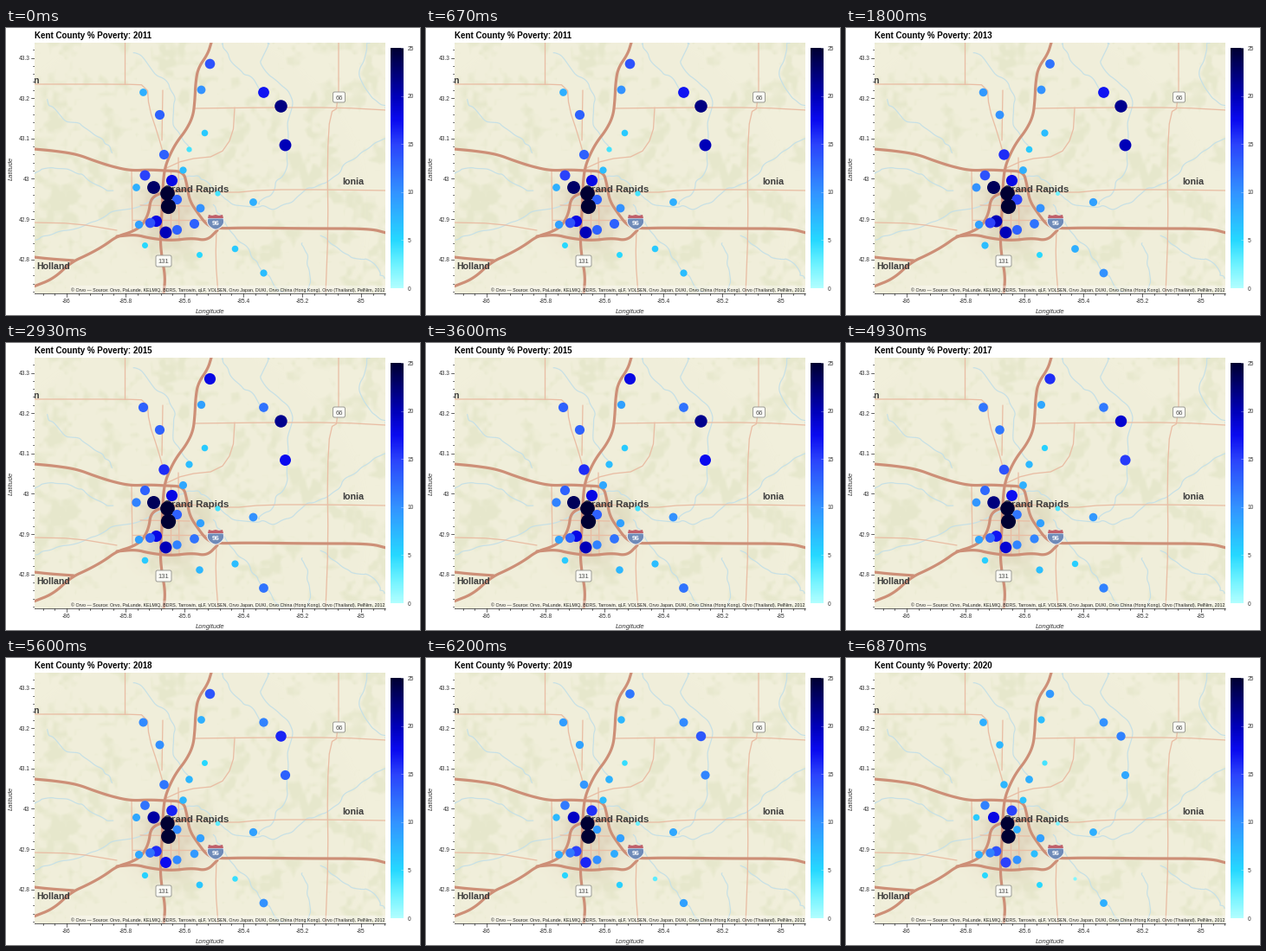
These frames come from a looping animation (478 px wide and 332 px high, 7.34 s). A matplotlib script:

```python
import matplotlib.pyplot as plt
import numpy as np
from matplotlib.animation import FuncAnimation
from matplotlib.collections import LineCollection
from matplotlib.colors import LinearSegmentedColormap
from matplotlib.patches import FancyBboxPatch, Polygon, Rectangle

W, H, DPI = 478, 332, 100
LEFT, RIGHT, TOP, BOTTOM = 33, 438, 17, 307
PT = 72 / DPI
STEP, LOOP = 20, 7340
YEAR_MS = 2200 / 3
MAX_VALUE = 25

plt.rcParams["font.family"] = "Liberation Sans"
rng = np.random.default_rng(7)

SCALE = LinearSegmentedColormap.from_list("poverty", [
    (0.0, "#b2ffff"), (0.1, "#6cf2ff"), (0.2, "#26d8ff"), (0.4, "#3392ff"),
    (0.6, "#2b42fb"), (0.7, "#0a0af0"), (0.8, "#0000b8"), (1.0, "#000032")])

SITES = np.array([
    (235, 41), (225, 71), (158, 74), (177, 100), (297, 74), (317, 90),
    (322, 135), (229, 121), (211, 140), (182, 146), (204, 164), (160, 170),
    (191, 176), (150, 184), (170, 184), (186, 191), (197, 198), (187, 206),
    (244, 191), (285, 201), (224, 208), (217, 226), (173, 223), (166, 225),
    (153, 227), (184, 236), (197, 233), (160, 251), (223, 262), (264, 255),
    (297, 283)])

# Poverty rate of each site in the key years
KEY_YEARS = (2011, 2013, 2015, 2020)
RATES = np.array([
    (14, 12, 18, 9.5), (10, 10, 9, 7), (8, 9.5, 13, 8), (13, 10, 13, 7.5),
    (17, 17, 12, 10), (22, 21.5, 21.5, 11), (20, 20, 17.5, 8.5),
    (6, 7, 6, 4), (4, 6, 7, 8), (13, 16, 16, 7.5), (7, 8, 8.5, 6.5),
    (15, 14, 13, 11), (18, 18, 18, 15), (8, 10, 11, 6), (23, 23.5, 23.5, 18),
    (29, 29, 29, 26), (13, 15, 13, 8), (31, 31, 31, 28), (4, 2.5, 4, 2.2),
    (8, 9, 10, 8), (10, 10, 9, 9), (13, 12, 12, 7), (18, 20, 18, 14),
    (14, 15, 13, 11), (9, 9, 9, 8), (20, 20, 20, 15), (13, 13, 11, 10),
    (5, 7, 6, 5), (5, 5, 7.5, 5), (6, 8, 7, 1.8), (7, 10, 12, 8)])

HIGHWAYS = [
    [(237, 17), (233, 30), (222, 46), (219, 62), (218, 84), (216, 102),
     (208, 118), (197, 132), (189, 147), (183, 163), (181, 185), (180, 215),
     (178, 245), (180, 266), (184, 288), (182, 308)],
    [(32, 140), (55, 142), (82, 146), (103, 154), (125, 161), (145, 165),
     (165, 164), (185, 165), (205, 166), (209, 182), (212, 200), (222, 215),
     (232, 228), (244, 232), (275, 231), (350, 232), (420, 232), (439, 237)],
    [(32, 299), (55, 290), (75, 271), (95, 262), (113, 252), (128, 241),
     (145, 236), (157, 229), (165, 214), (167, 197), (180, 190), (212, 187)],
    [(128, 241), (150, 239), (165, 243), (190, 246), (215, 243), (232, 246),
     (244, 234)],
    [(32, 265), (50, 267), (78, 269)],
]
MINOR_ROADS = [
    [(32, 65), (137, 65), (163, 66), (165, 92), (175, 122), (183, 150)],
    [(137, 16), (137, 65)],
    [(218, 93), (300, 92), (385, 92), (439, 95)],
    [(384, 16), (384, 92), (374, 98), (371, 150), (372, 232), (369, 308)],
    [(264, 92), (262, 125), (246, 148), (207, 152), (183, 163)],
    [(212, 187), (258, 191), (300, 187), (372, 187), (439, 188)],
    [(243, 232), (242, 268), (245, 308)],
    [(181, 72), (180, 130)],
    [(145, 165), (146, 236)],
    [(155, 205), (212, 206)],
    [(146, 222), (232, 222)],
    [(190, 165), (190, 246)],
    [(199, 150), (200, 246)],
    [(32, 225), (80, 226), (128, 234)],
]
RIVERS = [
    [(304, 17), (290, 38), (310, 60), (332, 82), (325, 112), (327, 148),
     (313, 185), (292, 205)],
    [(439, 128), (405, 146), (375, 178), (345, 188), (318, 208), (285, 208),
     (252, 200), (232, 178), (214, 168), (186, 182), (160, 208), (118, 215),
     (82, 232), (33, 243)],
    [(240, 205), (262, 238), (281, 262), (302, 282), (318, 307)],
    [(150, 28), (172, 52), (195, 75), (190, 112), (214, 140)],
    [(33, 168), (62, 160), (92, 172), (120, 190)],
    [(250, 17), (262, 42), (285, 58), (300, 82)],
    [(420, 17), (405, 52), (420, 80), (438, 92)],
    [(365, 240), (392, 262), (420, 268), (438, 290)],
    [(46, 85), (70, 108), (102, 118), (122, 142)],
    [(340, 250), (352, 272), (347, 306)],
]


def smooth(points, rounds=3):
    """Round a polyline by cutting its corners."""
    p = np.asarray(points, float)
    for _ in range(rounds):
        a, b = p[:-1], p[1:]
        cut = np.stack([0.75 * a + 0.25 * b, 0.25 * a + 0.75 * b], 1)
        p = np.vstack([p[:1], cut.reshape(-1, 2), p[-1:]])
    return p


def meander(points):
    p = smooth(points, 2)
    return smooth(p + rng.normal(0, 1.6, p.shape), 2)


def upsample(grid, rows, cols):
    """Stretch a coarse grid by linear interpolation on both axes."""
    h, w = grid.shape
    x, y = np.linspace(0, w - 1, cols), np.linspace(0, h - 1, rows)
    wide = np.array([np.interp(x, np.arange(w), row) for row in grid])
    return np.array([np.interp(y, np.arange(h), col) for col in wide.T]).T


def terrain():
    rows, cols = BOTTOM - TOP, RIGHT - LEFT
    noise = (0.6 * upsample(rng.random((14, 20)), rows, cols)
             + 0.4 * upsample(rng.random((50, 70)), rows, cols))
    y, x = np.mgrid[TOP:BOTTOM, LEFT:RIGHT]
    green = np.clip((noise - 0.52) * 5, 0, 1)[..., None]
    town = np.exp(-((x - 190) / 38) ** 2 - ((y - 212) / 36) ** 2)
    town = (town * np.clip(0.4 + noise, 0, 1))[..., None]
    land = np.array([241, 239, 219]) * (1 - green) + np.array([231, 232, 205]) * green
    return (land * (1 - town) + np.array([217, 203, 178]) * town) / 255


def full_axes(rect, x0, x1, y0, y1):
    ax = fig.add_axes(rect)
    ax.set(xlim=(x0, x1), ylim=(y1, y0))
    ax.axis("off")
    return ax


def label(ax, x, y, text, px, **kw):
    kw.setdefault("va", "center_baseline")
    return ax.text(x, y, text, fontsize=px * PT, clip_on=True, **kw)


def lines(ax, paths, color, px, z):
    ax.add_collection(LineCollection(
        paths, colors=color, linewidths=px * PT, zorder=z, capstyle="round"),
        autolim=False)


def shield(x, y, w, h, text):
    world.add_patch(FancyBboxPatch(
        (x - w / 2 + 2, y - h / 2 + 2), w - 4, h - 4, zorder=5,
        boxstyle="round,pad=2", fc="#fbfbf6", ec="#9a9a94", lw=0.7))
    label(world, x, y + 0.3, text, 7.6, ha="center", color="#555555", zorder=6)


def interstate(x, y):
    body = smooth([(-9, -4), (-10, 1), (-7, 6), (0, 10), (7, 6), (10, 1), (9, -4)], 2)
    world.add_patch(Polygon(body + (x, y), fc="#6f8bb8", ec="#f2f2f2", lw=0.7, zorder=5))
    band = np.array([(-8, -8), (-4, -7), (0, -8), (4, -7), (8, -8), (9, -4), (-9, -4)])
    world.add_patch(Polygon(band + (x, y), fc="#c0606a", ec="none", zorder=6))
    label(world, x, y + 1.5, "96", 8, ha="center", color="white",
          weight="bold", zorder=7)


def draw_map():
    world.imshow(terrain(), extent=(LEFT, RIGHT, BOTTOM, TOP), aspect="auto",
                 interpolation="nearest", zorder=0)
    lines(world, [meander(r) for r in RIVERS], "#c6e0e6", 1.2, 1)
    lines(world, [smooth(r, 1) for r in MINOR_ROADS], "#e9bda4", 1.3, 2)
    lines(world, [smooth(r) for r in HIGHWAYS], "#cd8f77", 3.2, 3)
    shield(384.5, 80, 14, 12, "66")
    shield(182, 269.5, 18, 13, "131")
    interstate(242, 224)
    town = dict(weight="bold", color="#3d3d3d", zorder=8, va="baseline")
    label(world, 181.5, 189.5, "Grand Rapids", 11.5, **town)
    label(world, 388, 181, "Ionia", 10.8, **town)
    label(world, 35.5, 279, "Holland", 10.5, **town)
    label(world, 37.5, 64, "n", 10.5, ha="right", **town)
    world.add_patch(Rectangle((74, 298), 364, 9, fc="white", alpha=0.35, zorder=9))
    label(world, 437, 303, "© Orvo — Source: Orvo, PaLunde, KELMIQ, BDRS, Tarrowin, qLF, "
          "VOLSEN, Orvo Japan, DUKI, Orvo China (Hong Kong), Orvo (Thailand), "
          "PelNim, 2012", 5.25, ha="right", color="#222222", zorder=10)


def draw_axes():
    x0, y0 = LEFT + 0.5, BOTTOM - 0.5
    marks = [[(x0, TOP), (x0, y0)], [(x0, y0), (RIGHT, y0)]]
    for i in range(-2, 28):
        x = 70 + 13.6 * i
        if x0 < x < RIGHT:
            marks.append([(x, y0 - (i % 5 == 0)), (x, y0 + (4 if i % 5 == 0 else 2.5))])
    for i in range(-1, 30):
        y = 34.5 + 9.33 * i
        if TOP < y < y0:
            marks.append([(x0 + (i % 5 == 0), y), (x0 - (4 if i % 5 == 0 else 2.5), y)])
    lines(page, marks, "#222222", 0.7, 1)
    for i, name in enumerate(("-86", "-85.8", "-85.6", "-85.4", "-85.2", "-85")):
        label(page, 70 + 68 * i, 315.5, name, 6.6, ha="center", color="#333333")
    for i, name in enumerate(("43.3", "43.2", "43.1", "43", "42.9", "42.8")):
        label(page, 27.5, 34.5 + 46.65 * i, name, 6.6, ha="right", color="#333333")
    label(page, 236, 327, "Longitude", 7.6, ha="center", style="italic", color="#333333")
    label(page, 6.5, 162.5, "Latitude", 7.6, ha="center", va="center", rotation=90,
          style="italic", color="#333333")


def draw_colorbar():
    top, bottom = 23, 301
    page.imshow(np.linspace(1, 0, 256)[:, None], cmap=SCALE, vmin=0, vmax=1,
                extent=(444, 459, bottom, top), aspect="auto",
                interpolation="nearest")
    ticks = [bottom - (bottom - top) * v / MAX_VALUE for v in range(0, 26, 5)]
    lines(page, [[(456, y), (459, y)] for y in ticks], "#ffffff90", 0.6, 2)
    for v, y in zip(range(0, 26, 5), ticks):
        label(page, 463.5, y, str(v), 6.6, color="#333333")


fig = plt.figure(figsize=(W / DPI, H / DPI), dpi=DPI, facecolor="white")
page = full_axes((0, 0, 1, 1), 0, W, 0, H)
world = full_axes((LEFT / W, 1 - BOTTOM / H, (RIGHT - LEFT) / W, (BOTTOM - TOP) / H),
                  LEFT, RIGHT, TOP, BOTTOM)
draw_map()
draw_axes()
draw_colorbar()
for ax, box in ((page, (0, W, 0, H)), (world, (LEFT, RIGHT, TOP, BOTTOM))):
    ax.set(xlim=box[:2], ylim=(box[3], box[2]))

title = label(page, 33, 12.5, "", 9.75, weight="bold", color="black", va="baseline")
dots = world.scatter(*(SITES + 0.5).T, linewidths=0, zorder=12)


def update(frame):
    year = 2011 + min(9, int((frame * STEP + 14) / YEAR_MS))
    # rates stay level through 2016, then drift to the last key year
    when = year if year <= 2015 else 2015 + (year - 2016) * 1.25
    rates = np.array([np.interp(when, KEY_YEARS, r) for r in RATES])
    radius = 1.55 * np.sqrt(rates)
    dots.set_sizes((2 * radius * PT) ** 2)
    dots.set_facecolor(SCALE(np.clip(rates / MAX_VALUE, 0, 1)))
    title.set_text(f"Kent County % Poverty: {year}")
    return dots, title


anim = FuncAnimation(fig, update, frames=LOOP // STEP, interval=STEP,
                     repeat=True, repeat_delay=0, blit=False)
plt.show()
```
